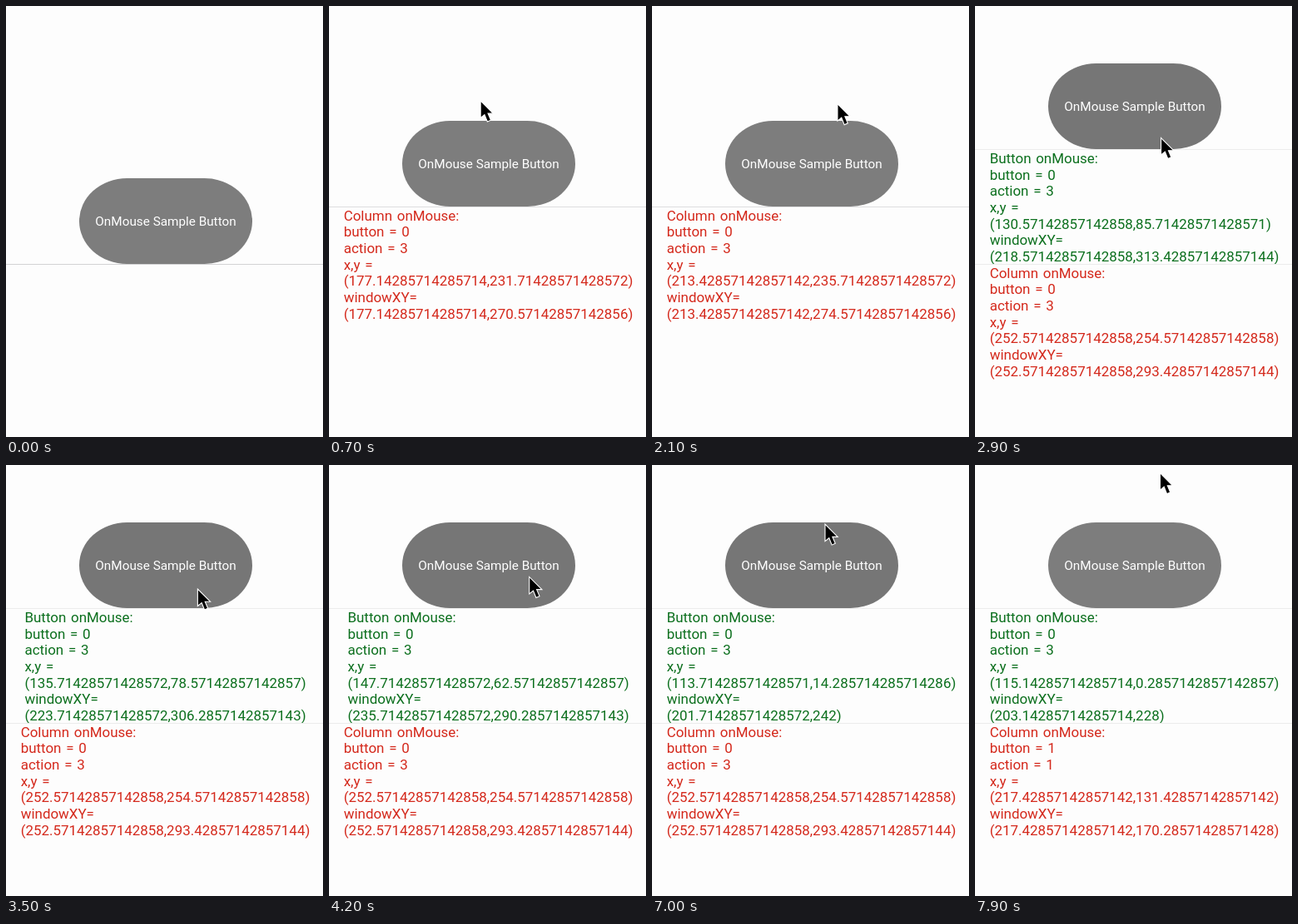
These frames come from a looping animation (381 px wide and 518 px high, 8 s). An HTML page:

```html
<!DOCTYPE html>
<html lang="en">
<head>
<meta charset="utf-8">
<title>Mouse events</title>
<style>
html, body { margin: 0; width: 100%; height: 100%; overflow: hidden; background: #fdfdfd; }
#stage {
  position: relative; width: 381px; height: 518px; overflow: hidden;
  display: flex; flex-direction: column; align-items: center; justify-content: center;
  font: 16.95px/19.67px Roboto, sans-serif;
}
#button {
  position: relative; top: -.7px; z-index: 1; flex: none;
  width: 208.5px; height: 103.5px; margin-left: 3px; border-radius: 58px / 52px;
  color: #fff; font-size: 15.3px; line-height: 104px; text-align: center;
}
p {
  position: relative; margin: 0; width: 100%; padding-left: 2px; box-sizing: border-box;
  display: flex; justify-content: center; white-space: pre; word-spacing: 1.5px;
}
p::before {
  content: ""; position: absolute; left: 0; top: -1px;
  width: 100%; height: 1px; background: var(--line);
}
span { position: relative; top: .8px; }
#green { color: #0b6f1d; }
#red { color: #d4281b; }
svg { position: absolute; left: 0; top: 0; z-index: 2; overflow: visible; }
</style>
</head>
<body>
<div id="stage">
  <div id="button">OnMouse Sample Button</div>
  <p id="green"><span></span></p>
  <p id="red"><span></span></p>
  <svg width="1" height="1">
    <path id="cursor" d="M0 0V20.5L4.8 16.6L8.2 25L12.3 23.2L8.9 15.2H15.2Z" fill="#000" stroke="#fff" stroke-width="1.1"/>
  </svg>
</div>
<script>
const LOOP = 8000, TICK = 100;
const APPEAR = 500, FIRST_REPORT = 700, ENTER = 2900, LEAVE = 7200;
const LAG = 90; // reports trail the pointer by this many ms
const $ = id => document.getElementById(id);

// Pointer moves: start, end, x and y reached, in sevenths of a window unit
const moves = [
  [0, 1, 1240, 1894],
  [900, 1110, 1268, 1850],
  [1110, 1310, 1286, 1940],
  [1400, 2200, 1560, 1916],
  [2200, 2550, 1768, 2054],
  [2800, 2810, 1530, 2194],
  [3100, 4110, 1650, 2032],
  [4300, 4310, 1332, 2046],
  [6400, 6910, 1412, 1694],
  [6910, 7010, 1422, 1596],
  [7010, 7440, 1522, 1192]
];

// Clicks: pressed, released, next event, mouse button
const clicks = [[4700, 5100, 5500, 1], [5500, 6100, 6500, 2], [7900, LOOP, LOOP, 1]];

function pointer(t) {
  let x = 0, y = 0;
  for (const [start, end, toX, toY] of moves) {
    const k = Math.min(1, Math.max(0, (t - start) / (end - start)));
    x += (toX - x) * k;
    y += (toY - y) * k;
  }
  return [x, y];
}

function report(name, t, dx, dy) {
  const [x, y] = pointer(t - LAG).map(v => 2 * Math.round(v / 2));
  const [, up, , pressed] = clicks.find(c => t >= c[0] && t < c[2]) || [0, 0, 0, 0];
  const action = !pressed ? 3 : t < up ? 1 : 2;
  return `${name} onMouse:\nbutton = ${pressed}\naction = ${action}\nx,y =\n` +
    `(${(x - dx) / 7},${(y - dy) / 7})\nwindowXY=\n(${x / 7},${y / 7})`;
}

function show(id, text) {
  const span = $(id).firstChild;
  if (span.textContent !== text) span.textContent = text;
}

function draw() {
  const t = Math.floor(performance.now() % LOOP / TICK) * TICK;
  const hovered = t >= ENTER && t < LEAVE;

  // Each report keeps the last event its element received
  const columnTime = hovered ? ENTER - TICK : t;
  const buttonTime = Math.min(t, LEAVE - TICK);
  show('red', t < FIRST_REPORT ? '' : report('Column', columnTime, 0, 272));
  show('green', t < ENTER ? '' : report('Button', buttonTime, 616, 1594));

  $('button').style.background = hovered ? '#767676' : '#7d7d7d';
  $('stage').style.setProperty('--line', t < FIRST_REPORT ? '#d2d2d4' : t < ENTER ? '#dedee0' : '#ececec');

  const [x, y] = pointer(t);
  $('cursor').style.display = t < APPEAR ? 'none' : '';
  $('cursor').setAttribute('transform', `translate(${x / 7 + 5} ${(y / 7 - 161) * 1.04})`);
  requestAnimationFrame(draw);
}
draw();
</script>
</body>
</html>
```
